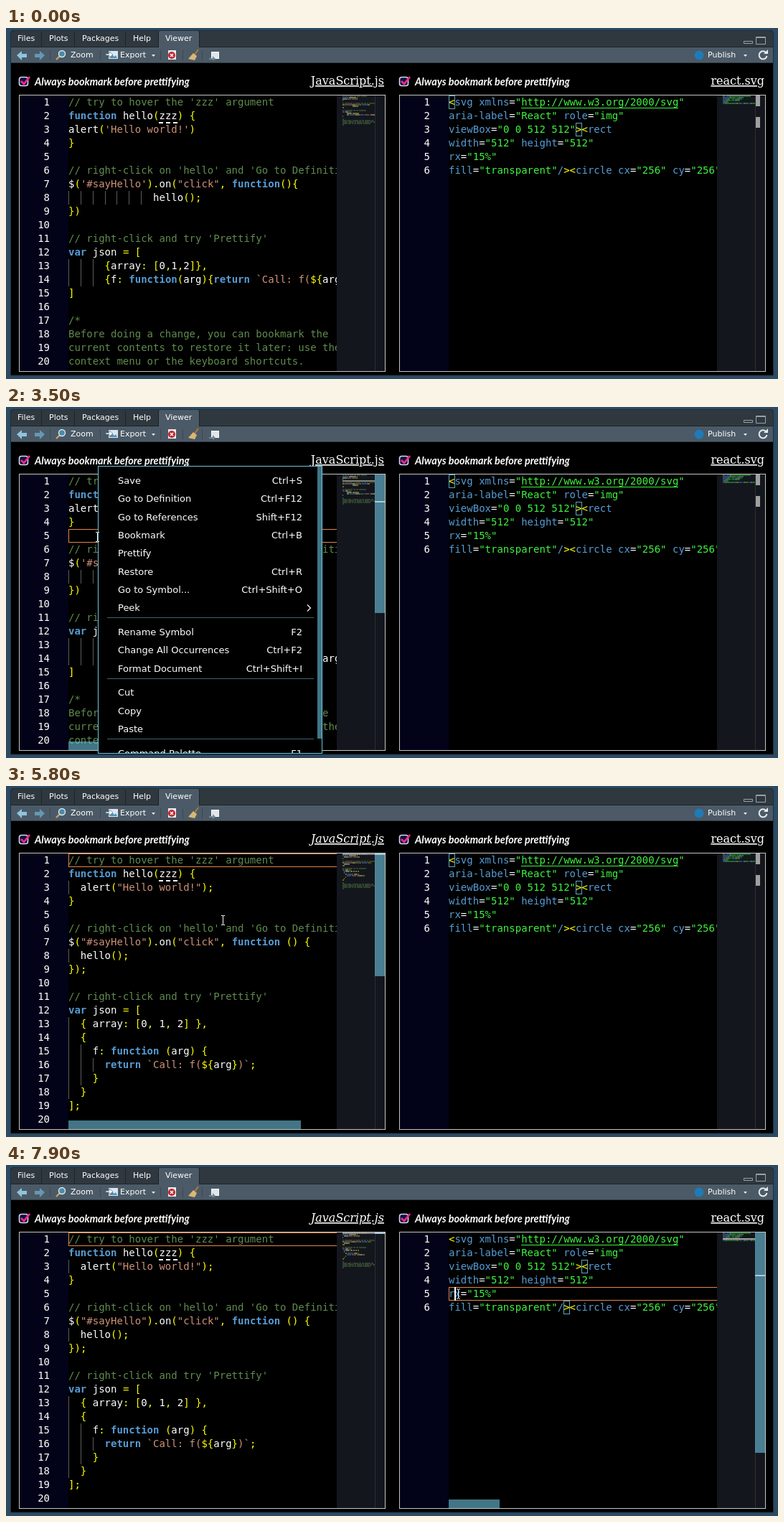
An HTML page that plays this animation: 1076x489 px, repeating every 8 s.

```html
<!DOCTYPE html>
<html lang="en">
<head>
<meta charset="utf-8">
<title>Viewer</title>
<style>
html, body { margin: 0; width: 100%; height: 100%; overflow: hidden; background: #2c4a61; }
svg { display: block; }
text { white-space: pre; fill: #fff; }
.ui text { font: 11px "DejaVu Sans", sans-serif; }
.menu text { font: 13px "DejaVu Sans", sans-serif; }
.code text { font: 14px "DejaVu Sans Mono", monospace; }
.note { font: italic 700 14.4px Lato, sans-serif; }
.file { font: 16px "DejaVu Serif", serif; text-decoration: underline; text-decoration-thickness: 1px; }
.end { text-anchor: end; }
.code .com { fill: #608b4e; }
.code .str { fill: #ce9178; }
.code .key { fill: #569cd6; font-weight: 700; }
.code .del { fill: #ff0; }
.code .tag { fill: #569cd6; }
.code .val { fill: #3ff23f; }
.code .txt { fill: #fff; }
.map { opacity: .5; }
.guide { stroke: #5c5c5c; }
.slider { fill: #6fc3df; fill-opacity: .6; }
.line { fill: none; stroke: #e2864a; }
.match { fill: none; stroke: #6fc3df; stroke-opacity: .85; }
</style>
</head>
<body>
<svg id="stage" width="1076" height="489" viewBox="0 0 1076 489"></svg>
<script>
const CW = 8.428, LH = 19, TOP = 94, LOOP = 8000;

const raw = `// try to hover the 'zzz' argument
function hello(zzz) {
alert('Hello world!')
}

// right-click on 'hello' and 'Go to Definition'
$('#sayHello').on("click", function(){
              hello();
})

// right-click and try 'Prettify'
var json = [
      {array: [0,1,2]},
      {f: function(arg){return \`Call: f(\${arg})\`}}
]

/*
Before doing a change, you can bookmark the
current contents to restore it later: use the
context menu or the keyboard shortcuts.
*/`;

const pretty = `// try to hover the 'zzz' argument
function hello(zzz) {
  alert("Hello world!");
}

// right-click on 'hello' and 'Go to Definition'
$("#sayHello").on("click", function () {
  hello();
});

// right-click and try 'Prettify'
var json = [
  { array: [0, 1, 2] },
  {
    f: function (arg) {
      return \`Call: f(\${arg})\`;
    }
  }
];

` + raw.slice(raw.indexOf('/*'));

const markup = `<svg xmlns="http://www.w3.org/2000/svg"
aria-label="React" role="img"
viewBox="0 0 512 512"><rect
width="512" height="512"
rx="15%"
fill="transparent"/><circle cx="256" cy="256" r="36"/>`;

const rules = {
  js: [
    [/^\/\/.*/, 'com'],
    [/^('[^']*'|"[^"]*"|`[^$`]*|\)`)/, 'str'],
    [/^(function|var|return)\b/, 'key'],
    [/^(\$\{|[(){}[\];:=,.])/, 'del']
  ],
  xml: [
    [/^"[^"]*"/, 'val'],
    [/^[<>]/, 'del'],
    [/^(\/|[a-z][\w-]*)/i, 'tag']
  ],
  plain: []
};
const rest = [/^(\w+|\s+|.)/, 'txt'];

const esc = s => s.replace(/&/g, '&amp;').replace(/</g, '&lt;');
const rect = (x, y, w, h, attrs = '') => `<rect x="${x}" y="${y}" width="${w}" height="${h}" ${attrs}/>`;
const text = (x, y, s, cls = '') => `<text x="${x}" y="${y}" class="${cls}">${s}</text>`;
const path = (d, attrs) => `<path d="${d}" ${attrs}/>`;
const group = (id, body, attrs = '') => `<g id="${id}" ${attrs}>${body}</g>`;
const rowY = n => TOP + LH * (n - 1);

function tokens(line, lang) {
  const out = [];
  while (line) {
    const [re, cls] = [...rules[lang], rest].find(r => r[0].test(line));
    const s = line.match(re)[0];
    out.push([s, cls]);
    line = line.slice(s.length);
  }
  return out;
}

// Code lines with indent guides, plus the minimap beside them
function code(src, lang, x0) {
  let body = '', map = '', block = false;
  src.split('\n').forEach((line, i) => {
    if (line.startsWith('/*')) block = true;
    const indent = line.search(/\S|$/), y = TOP + LH * i;
    const toks = block && lang === 'js' ? [[line, 'com']] : tokens(line.trim(), lang);
    if (line.startsWith('*/')) block = false;
    for (let k = 0; k < indent; k += 2)
      body += path(`M${Math.round(x0 + k * CW) + .5} ${y}v${LH}`, 'class="guide"');
    body += text(x0 + indent * CW, y + 14, toks.map(([s, c]) => `<tspan class="${c}">${esc(s)}</tspan>`).join(''));
    let col = indent;
    for (const [s, c] of toks) {
      let d = '';
      for (const ch of s) {
        if (ch !== ' ' && col < 45) d += `M${x0 + 382 + col} ${TOP + 2 * i + .3}h1v1.4h-1z`;
        col++;
      }
      if (d) map += path(d, `class="${c}"`);
    }
  });
  return `<g clip-path="url(#clip${x0})">${body}</g><g class="map">${map}</g>`;
}

// Frame, gutter and minimap strip of one editor
function shell(x, rows) {
  let s = rect(x + .5, 93.5, 510, 385, 'fill="#000" stroke="#c4c4c4"')
    + rect(x + 1, 94, 68, 384, 'fill="#020218"')
    + rect(x + 443, 94, 67, 384, 'fill="#14161e"')
    + rect(x + 496, 94, 1, 384, 'fill="#2c2e36"');
  for (let n = 1; n <= rows; n++) s += text(x + 43, rowY(n) + 14, n, 'end');
  return s;
}

function heading(x, name, id) {
  return rect(x + .5, 68.5, 12, 12, 'rx="3" fill="#10103a" stroke="#d4d8f4" stroke-width="1.6"')
    + path(`M${x + 3} 74l4 4 8-10`, 'fill="none" stroke="#f0288c" stroke-width="2.8"')
    + text(x + 22, 80, 'Always bookmark before prettifying', 'note')
    + `<text id="${id}" x="${x + 509}" y="79" class="file end">${name}</text>`;
}

const focusRow = (id, x) => group(id,
  `<g clip-path="url(#clip${x})">${rect(x + .5, 94.5, 380, 18, 'class="line"')}</g>`);
const caret = (id, x) => rect(x, TOP, 2, LH, `id="${id}" fill="#fff"`);
const match = (row, col) => rect(Math.round(617 + col * CW) + .5, rowY(row) + .5, 8, 18, 'class="match"');

function toolbar() {
  const tabs = [[16, 'Files'], [60, 'Plots'], [106, 'Packages'], [177, 'Help'], [222, 'Viewer']];
  let s = path('M7 49V8q0-4 4-4H1065q4 0 4 4V49z', 'fill="#2f383f"')
    + rect(7, 27, 1062, 21, 'fill="#4b5a66"')
    + path('M213 27V7q0-3 3-3h50q3 0 3 3v20z', 'fill="#4b5a66"')
    + path('M49.5 5v21M95.5 5v21M166.5 5v21M212.5 5v21M269.5 5v21', 'stroke="#1c2429"')
    + path('M7 26.5H213M269 26.5H1069', 'stroke="#1c2429"')
    + path('M61.5 31v14M131.5 31v14M215.5 31v14M246.5 31v14M273.5 31v14', 'stroke="#3c4953"');
  for (const [x, t] of tabs) s += text(x, 18, t);
  s += text(90, 41, 'Zoom') + text(159, 41, 'Export') + text(978, 41, 'Publish');
  // window buttons
  s += path('M1028.5 18.5h12v3h-12zM1045.5 12.5h13v10h-13zM1045 13.5h14', 'fill="none" stroke="#98a2a8"');
  // back and forward
  s += path('M15 38l7-6v4h7v5h-7v4z', 'fill="#8fc3dd"') + path('M54 38l-7-6v4h-7v5h7v4z', 'fill="#6598b3"');
  // magnifier
  s += path('M75 39l-5 5', 'stroke="#c9a063" stroke-width="2.4"')
    + '<circle cx="78" cy="36" r="4.5" fill="#4b8ca8" stroke="#dce9ee" stroke-width="1.4"/>';
  // export picture
  s += rect(143, 32, 13, 11, 'fill="#dce7ef"') + path('M144 42l4-5 3 3 2-2 2 4z', 'fill="#4b91b8"')
    + path('M139 36h5v-3l5 4-5 4v-3h-5z', 'fill="#fff" stroke="#3d5a70" stroke-width=".6"');
  s += path('M203 37h5l-2.500 3zM1028 37h5l-2.500 3z', 'fill="#e8eef2"');
  // remove page
  s += rect(226, 31, 11, 13, 'fill="#e8edf0"') + '<circle cx="231" cy="38" r="5" fill="#c1272d"/>'
    + path('M229 36l4 4m0-4l-4 4', 'stroke="#fff" stroke-width="1.4"');
  // broom
  s += path('M268 30l-5 7', 'stroke="#b07a3c" stroke-width="2"') + path('M261 35l5 4-3 6-9-2z', 'fill="#dcb673"');
  // pop out
  s += rect(286.5, 33.5, 10, 9, 'fill="#dfe6ea" stroke="#f5f8fa"') + path('M283 42h5v-3l4 4-4 3v-2h-5z', 'fill="#6d8794"');
  s += '<circle cx="966" cy="38" r="6.500" fill="#1f7ab8"/>';
  s += path('M1059.500 34.500a5.500 5.500 0 1 0 1 4.500', 'fill="none" stroke="#e6ecef" stroke-width="2"')
    + path('M1062 30v6h-6z', 'fill="#e6ecef"');
  return s;
}

function menu() {
  const items = [
    ['Save', 'Ctrl+S'], ['Go to Definition', 'Ctrl+F12'], ['Go to References', 'Shift+F12'],
    ['Bookmark', 'Ctrl+B'], ['Prettify', ''], ['Restore', 'Ctrl+R'],
    ['Go to Symbol...', 'Ctrl+Shift+O'], ['Peek', ''], null,
    ['Rename Symbol', 'F2'], ['Change All Occurrences', 'Ctrl+F2'], ['Format Document', 'Ctrl+Shift+I'], null,
    ['Cut', ''], ['Copy', ''], ['Paste', ''], null, ['Command Palette', 'F1']
  ];
  let y = 107, s = rect(128.5, 82.5, 312, 400, 'fill="#000" stroke="#6fc3df"'), list = '';
  for (const it of items) {
    if (!it) {
      list += rect(141, Math.round(y - 16.500), 288, 1, 'fill="#3a6575"');
      y += 8.300;
      continue;
    }
    list += text(156, Math.round(y), it[0]) + text(413, Math.round(y), it[1], 'end');
    y += 25.350;
  }
  s += `<g clip-path="url(#clipMenu)">${list}</g>`;
  s += path('M420 275.500l4.500 4.500-4.500 4.500', 'fill="none" stroke="#fff" stroke-width="1.2"');
  s += rect(434, 83, 6, 379, 'class="slider"');
  return s + rect(129.5, 166.5, 310, 24.500, 'id="hover" class="line"');
}

const clip = (id, x, y, w, h) => `<clipPath id="${id}">${rect(x, y, w, h)}</clipPath>`;

const zzz = path('M213 132h26', 'id="zzz" stroke="#fff" stroke-width="2" stroke-dasharray="6 4"');

document.getElementById('stage').innerHTML =
  `<defs>${clip('clip87', 87, 94, 374, 384)}${clip('clip617', 617, 94, 374, 384)}${clip('clipMenu', 129, 83, 311, 399)}</defs>`
  + rect(0, 0, 1076, 489, 'fill="#2c4a61"')
  + path('M6.500 484V8q0-4.500 4.500-4.500H1065q4.500 0 4.500 4.500V484z', 'fill="#000" stroke="#1d3040"')
  + group('bar', toolbar(), 'class="ui"')
  + heading(18, 'JavaScript.js', 'jsName') + heading(548, 'react.svg', 'svgName')
  + group('left', shell(18, 20)
    + group('raw', code(raw, 'js', 87)) + group('plain', code(pretty, 'plain', 87))
    + group('pretty', code(pretty, 'js', 87)) + zzz
    + focusRow('rowL', 87) + caret('caretL', 87)
    + rect(469, TOP, 45, 2, 'id="mapL" fill="#c8c4c0" fill-opacity=".6"')
    + rect(514, TOP, 14, 193, 'id="barV" class="slider"')
    + rect(87, 466, 313, 12, 'id="barH" class="slider"')
    + rect(514, 131, 14, 2, 'id="markL" fill="#a9cdda"'), 'class="code"')
  + group('right', shell(548, 6) + code(markup, 'xml', 617)
    + rect(718, 111, 219, 1, 'fill="#3ff23f"')
    + group('pairA', match(1, 0) + match(3, 21)
      + rect(1045, 94, 6, 15, 'fill="#a0a0a0"') + rect(1045, 124, 6, 15, 'fill="#a0a0a0"'))
    + group('pairB', match(3, 22) + match(6, 19) + rect(999, 102, 45, 2, 'fill="#c8c4c0" fill-opacity=".8"'))
    + focusRow('rowR', 617) + caret('caretR', 625)
    + group('barsR', rect(1044, 94, 14, 307) + rect(617, 466, 71, 12), 'class="slider"')
    + rect(1044, 153, 14, 2, 'id="markR" fill="#a9cdda"'), 'class="code"')
  + group('menu', menu(), 'class="menu"')
  + group('arrow', path('M0 0v15l3.500-3 2.500 5 2-1-2.500-5H10z', 'fill="#fff" stroke="#000" stroke-width=".8"'))
  + group('beam', path('M-2.500-6.500h2l.5.5.5-.5h2M0-6V6M-2.500 6.500h2l.5-.5.5.5h2', 'fill="none" stroke="#fff"'))
  + group('hand', path('M-1.500 8V1.200a1.300 1.300 0 0 1 2.600 0V6l5.500 1.200q1.600.5 1.400 2l-.6 4-1 2H0L-4 10.500q-.7-2 1-1.700z',
    'fill="#fff" stroke="#000" stroke-width=".8"'));

const el = {};
document.querySelectorAll('#stage [id]').forEach(e => el[e.id] = e);
const show = (id, on) => { el[id].style.display = on ? '' : 'none'; };
const fade = (id, o) => { el[id].style.opacity = o; };
const ramp = (t, a, b) => Math.min(1, Math.max(0, (t - a) / (b - a)));
const within = (t, ...spans) => spans.some(([a, b]) => t >= a && t < b);

// Pointer track: time, x, y, shape
const track = [
  [800, 172, 48, 'arrow'], [900, 164, 70, 'arrow'], [1000, 150, 112, 'beam'], [1200, 132.5, 170, 'beam'],
  [1300, 128.5, 183, 'beam'], [1500, 128.5, 183, 'beam'], [1700, 128.5, 180.5, 'beam'],
  [3400, 128.5, 180.5, 'beam'], [3500, 127.5, 181, 'beam'], [3600, 138, 182, 'hand'],
  [3800, 163, 196, 'hand'], [4000, 163, 196, 'hand'], [4300, 166, 200.5, 'hand'],
  [5300, 166, 200.5, 'hand'], [5400, 186, 204, 'beam'], [5800, 302.5, 187, 'beam'],
  [6000, 490, 178, 'beam'], [6200, 612, 173, 'beam'], [6500, 626.5, 172, 'beam'],
  [7100, 626.5, 172, 'beam'], [7500, 630.5, 178, 'beam'], [7600, 630.5, 178, 'beam'],
  [7700, 630.5, 179.5, 'beam'], [LOOP, 630.5, 179.5, 'beam']
];

function pointer(t) {
  const i = track.findIndex(k => k[0] > t) - 1;
  let shape = '';
  if (i >= 0) {
    const [a, b] = [track[i], track[i + 1]], f = ramp(t, a[0], b[0]);
    shape = a[3];
    const at = k => a[k] + (b[k] - a[k]) * f;
    el[shape].setAttribute('transform', `translate(${at(1)} ${at(2)})`);
  }
  for (const s of ['arrow', 'beam', 'hand']) show(s, s === shape);
}

function render(t) {
  const done = t >= 4900, tinted = t >= 5100, clicked = t >= 7900;
  show('raw', !done);
  show('plain', done && !tinted);
  show('pretty', tinted);
  show('zzz', !done || tinted);
  el.jsName.style.fontStyle = done ? 'italic' : 'normal';

  const y = done ? 0 : 4;
  for (const id of ['rowL', 'mapL', 'markL']) show(id, t >= 2000);
  el.rowL.setAttribute('transform', `translate(0 ${y * LH})`);
  el.caretL.setAttribute('y', TOP + y * LH);
  el.mapL.setAttribute('y', TOP + y * 2);
  el.markL.setAttribute('y', done ? TOP : 131);
  show('caretL', within(t, [2000, 2400], [4900, 5400], [5900, 6400], [7000, 7400]));

  const out = 1 - ramp(t, 6200, 6800);
  fade('barV', ramp(t, 900, 1100) * out);
  fade('barH', within(t, [4900, 5400]) ? 0 : ramp(t, 900, 1100) * out);
  el.barV.setAttribute('height', done ? 171 : 193);
  el.barH.setAttribute('width', done ? 324 : 313);

  fade('barsR', ramp(t, 5950, 6150));
  show('pairA', !clicked);
  for (const id of ['pairB', 'rowR', 'caretR', 'markR']) show(id, clicked);

  show('menu', within(t, [2900, 4900]));
  fade('menu', t < 3000 ? .6 : 1);
  show('hover', t >= 3600);
  el.hover.setAttribute('y', t < 3700 ? 166.5 : 191.5);
  pointer(t);
}

el.rowR.setAttribute('transform', `translate(0 ${4 * LH})`);
el.caretR.setAttribute('y', rowY(5));

function tick() {
  render(Math.floor(performance.now() % LOOP / 100) * 100);
  requestAnimationFrame(tick);
}
tick();
</script>
</body>
</html>
```
